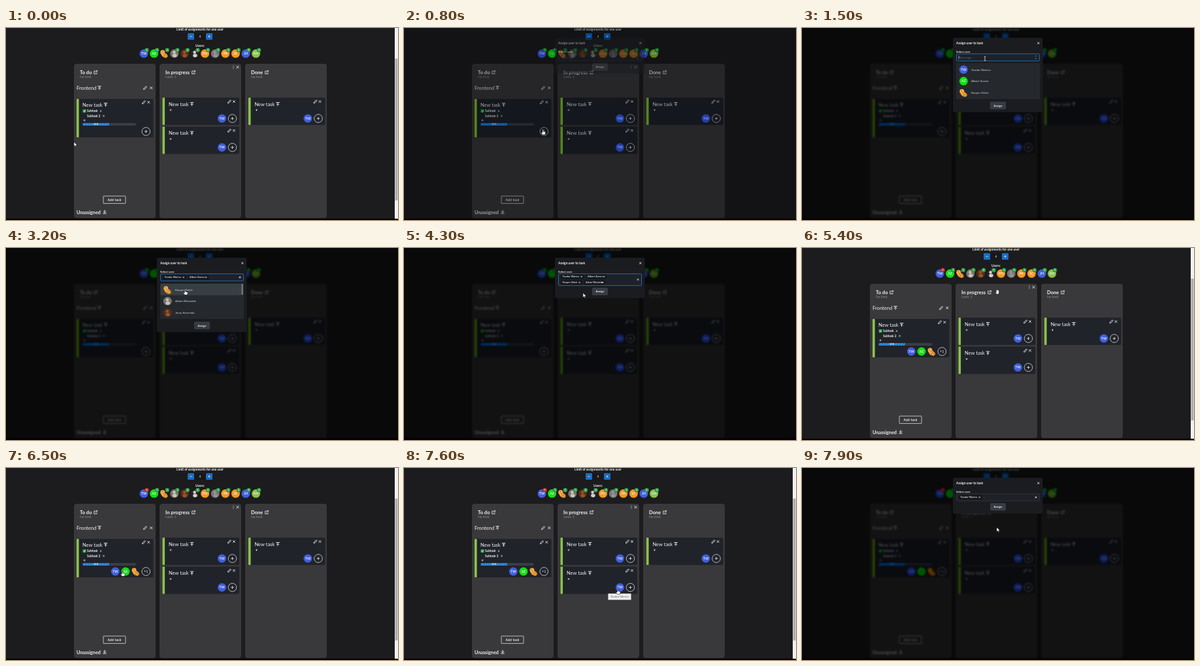
An HTML page that plays this animation: 600 by 295 pixels, repeating every 8000 ms.

```html
<!DOCTYPE html>
<html lang="en">
<head>
<meta charset="utf-8">
<title>Task board</title>
<style>
html, body { margin: 0; width: 100%; height: 100%; overflow: hidden; background: #000; }
svg { position: absolute; left: 0; top: 0; width: 600px; height: 295px; }
text { font-family: Lato, "Open Sans", sans-serif; white-space: pre; }
</style>
</head>
<body>
<svg id="board" viewBox="0 0 600 295"></svg>
<svg id="overlay" viewBox="0 0 600 295"></svg>
<script>
const LOOP = 8000, STEP = 100;
const board = document.getElementById('board');
const overlay = document.getElementById('overlay');

const GREEN = '#8bc34a', BLUE = '#3f5fdc', ORANGE = '#f9981d', CARD = '#20232a';
const users = [
  { name: 'Teodor Wanicz', tag: 'TW', fill: BLUE },
  { name: 'Albert Zumer', tag: 'AZ', fill: '#12e012' },
  { name: 'Kacper Zoleń', blob: true },
  { name: 'Adam Wostolak', fill: '#77756f', photo: '#c9c5bb' },
  { name: 'Jerzy Koremba', fill: '#5a2d16', photo: '#93562b' },
  { name: 'Natan Brozda', fill: '#252525', photo: '#d2d2cc' },
  { name: 'Pola Olmicka', tag: 'PO', fill: ORANGE },
  { fill: '#777', photo: '#949494' },
  { tag: 'PR', fill: ORANGE },
  { tag: 'SC', fill: ORANGE },
  { tag: 'JH', fill: BLUE },
  { tag: 'KH', fill: GREEN }
];

// Cursor keys: time, x, y, shape from that time on
const path = [
  [0, 104, 175, 'arrow'], [100, 104, 175, 'arrow'], [500, 211, 157, 'hand'],
  [900, 213, 157, 'arrow'], [1300, 280, 47, 'beam'], [1600, 280, 47, 'beam'],
  [1900, 272, 64, 'hand'], [2800, 272, 64, 'hand'], [3100, 274, 65, 'hand'],
  [4100, 274, 65, 'hand'], [4200, 274, 69, 'arrow'], [4400, 274, 69, 'arrow'],
  [4800, 299, 66, 'hand'], [5300, 299, 66, 'grab'], [5700, 299, 66, 'grab'],
  [6100, 290, 111, 'arrow'], [6400, 168, 159, 'hand'], [6700, 198, 160, 'hand'],
  [7000, 325, 178, 'hand'], [7200, 327, 187, 'hand'], [7600, 327, 187, 'hand'],
  [7700, 344, 182, 'hand'], [7800, 320, 134, 'arrow'], [7900, 298, 91, 'arrow']
];
const fade = [[0, 0], [700, 0], [900, 1], [5200, 1], [5400, 0], [7600, 0], [7800, 1], [8000, 1]];

// Linear value of column c in a table of keys
function at(keys, t, c) {
  const i = keys.findIndex(k => k[0] > t);
  if (i < 0) return keys[keys.length - 1][c];
  const a = keys[i - 1], b = keys[i];
  return a[c] + (b[c] - a[c]) * (t - a[0]) / (b[0] - a[0]);
}

const box = (x, y, w, h, fill, r = 0, more = '') =>
  `<rect x="${x}" y="${y}" width="${w}" height="${h}" fill="${fill}" rx="${r}" ${more}/>`;
const disc = (x, y, r, fill, more = '') => `<circle cx="${x}" cy="${y}" r="${r}" fill="${fill}" ${more}/>`;
const line = (d, w = 0.9, color = '#eee') =>
  `<path d="${d}" fill="none" stroke="${color}" stroke-width="${w}"/>`;
const place = (x, y, s, more = '') => `<g transform="translate(${x} ${y})" ${more}>${s}</g>`;
function text(x, y, s, size, { bold = false, fill = '#f2f2f2', mid = false, gap = 0 } = {}) {
  return `<text x="${x}" y="${y + size * 0.35}" font-size="${size}" fill="${fill}" font-weight="${bold ? 700 : 400}"` +
    `${mid ? ' text-anchor="middle"' : ''}${gap ? ` letter-spacing="${gap}"` : ''}>${s}</text>`;
}

const cross = (x, y, r = 1.8, w = 0.9) => place(x, y, line(`M${-r} ${-r}L${r} ${r}M${r} ${-r}L${-r} ${r}`, w));
const plus = (x, y, r = 1.8, w = 0.8) => place(x, y, line(`M${-r} 0H${r}M0 ${-r}V${r}`, w));
const pencil = (x, y) => place(x, y, line('M-2.5 2.5L-2 .8L1.3 -2.5L2.6 -1.2L-.8 2.1Z'));
const editIcon = (x, y) => place(x, y, line('M.5 -1.8H-2.3V2.5H2V.4M-.6 .8L2.5 -2.3M.8 -2.5H2.6V-.6', 0.8));
const raise = (x, y) => place(x, y, line('M-2.7 -2.5H2.7M0 2.8V-1M-2 .8L0 -1.2L2 .8', 1));
const lower = (x, y) => place(x, y, line('M-2.7 2.5H2.7M0 -2.8V1M-2 -.8L0 1.2L2 -.8', 1));
const ringAt = (x, y, label) =>
  disc(x, y, 6.3, 'none', 'stroke="#ddd" stroke-width=".8"') +
  (label ? text(x, y, label, 5.6, { mid: true }) : plus(x, y, 2.3));

function avatar(i, x, y) {
  const u = users[i];
  if (u.blob) {
    return place(x, y,
      '<ellipse cx="1.5" cy="2" rx="5.4" ry="3.4" transform="rotate(28)" fill="#f3a13a"/>' +
      disc(-2.5, -2, 3.5, '#f7ad49') +
      [[-3, -3], [-1, 0], [2, 2], [4, 4], [0, 4]].map(p => disc(p[0], p[1], 0.7, '#9c5419')).join(''));
  }
  const inside = u.tag ? text(0, 0, u.tag, 5, { mid: true, bold: true, fill: '#e9edff' })
    : disc(-0.4, -2, 2.2, u.photo) + `<ellipse cx=".4" cy="3" rx="3.2" ry="2.7" fill="${u.photo}"/>`;
  return place(x, y, disc(0, 0, 6.5, u.fill) + inside);
}

function column(x, title, limit, iconX) {
  return box(x, 55, 125, 237, '#39383a', 4) +
    text(x + 9, 68, title, 7.6, { bold: true }) + editIcon(iconX, 68) +
    text(x + 9, 75.3, limit, 5.1, { fill: '#8c8b8d' });
}

function card(x, y, h) {
  return box(x, y, 117.5, h, CARD, 2) + box(x, y, 3.6, h, GREEN, 1);
}

function smallCard(x, y) {
  return card(x, y, 42) + text(x + 9.5, y + 10, 'New task', 7.5) + raise(x + 45, y + 10) +
    pencil(x + 102.5, y + 6) + cross(x + 109.5, y + 6) + plus(x + 12.5, y + 19, 1.5, 0.7) +
    avatar(0, x + 91, y + 32) + ringAt(x + 107, y + 32);
}

function progress() {
  let s = box(117, 146, 82, 4, '#3a3d43', 2) + box(117, 146, 41, 4, '#1976d2', 2);
  for (let x = 119; x < 156; x += 4) s += line(`M${x} 149.6L${x + 2.5} 146.4`, 1.1, '#4b99e4');
  return s + text(137.8, 148, '50%', 3.6, { bold: true, mid: true });
}

function userRow(assigned) {
  return users.map((u, i) => {
    const x = 211 + i * 15.6;
    const left = i ? (assigned && i < 4 ? 3 : 4) : (assigned ? 0 : 1);
    return avatar(i, x, 39.3) + disc(x + 4.5, 34, 3.3, left ? '#2b9a43' : '#c62828') +
      text(x + 4.5, 34, left, 4, { mid: true, bold: true });
  }).join('');
}

function drawBoard(assigned, scrollbar) {
  let s = box(0, 0, 600, 293, '#1c1b1d');
  s += text(297, 2.6, 'Limit of assignments for one user', 4.9, { bold: true, mid: true });
  s += box(278, 8, 38, 10, '#18181b', 1);
  s += box(278, 8, 10, 10, '#1b6ec2', 1) + box(306, 8, 10, 10, '#1b6ec2', 1);
  s += line('M281.3 13H284.7', 0.8) + plus(311, 13, 1.7) + text(297, 13, '4', 4.8, { mid: true });
  s += text(297, 27, 'Users:', 5, { bold: true, mid: true }) + userRow(assigned);

  s += column(104, 'To do', 'No limit', 137) + column(235, 'In progress', 'Limit: 3', 287) +
    column(366, 'Done', 'No limit', 399);
  s += [58, 60, 62].map(y => disc(348, y, 0.6, '#eee')).join('') + cross(354.5, 60.2, 2);

  s += text(108, 92, 'Frontend', 7.6) + raise(143, 92) + pencil(213, 92) + cross(222.3, 92, 2);
  s += card(108, 109, 59) + text(117, 118, 'New task', 7.5) + raise(152.5, 118) +
    pencil(211, 114) + cross(218.3, 114);
  s += box(117.5, 125, 5, 5, '#2eb34a', 1) + line('M118.6 127.5L119.7 128.7L121.6 126.2', 0.8);
  s += text(124, 127.5, 'Subtask', 4.7, { bold: true }) + cross(145, 127.6, 1.3, 0.7);
  s += text(124, 135, 'Subtask 2', 4.7, { bold: true }) + cross(149.5, 135.1, 1.3, 0.7);
  s += plus(120, 141.8, 1.5, 0.7) + progress();
  if (assigned) s += [0, 1, 2].map(i => avatar(i, 167.3 + i * 15.6, 159)).join('');
  s += ringAt(214.3, 159, assigned ? '+1' : '');
  s += box(149, 258.2, 34, 11.4, 'none', 0.6, 'stroke="#ddd" stroke-width=".8"') +
    text(166, 264, 'Add task', 4.8, { bold: true, mid: true, gap: 0.3 });
  s += text(108, 283, 'Unassigned', 7.2, { bold: true }) + lower(151, 282.5);

  s += smallCard(239.5, 107) + smallCard(239.5, 151.5) + smallCard(371, 107);
  if (scrollbar) s += box(595, 0, 5, 293, '#f1f1f1') + box(595.5, 47, 4, 218, '#adadad');
  return s;
}

function chips(list) {
  const slots = [[240, 36], [278.5, 32], [240, 33], [275.5, 32]];
  return list.map((id, i) => {
    const [x, w] = slots[i], y = (list.length > 2 ? 44 : 45) + (i > 1 ? 9 : 0);
    return box(x, y - 3.6, w, 7.2, '#15171b', 1.5) +
      text(x + 2.6, y, users[id].name, 3.9, { bold: true, fill: '#d8d8d8' }) + cross(x + w - 4.3, y, 1.1, 0.7);
  }).join('');
}

function drawModal({ picked, open, focus, hover }) {
  const grow = picked.length > 2 ? 7 : 0;
  const top = 54 + grow, foot = (open ? 113.3 : 54) + grow;
  let s = box(231, 15, 137.5, foot + 16 - 15, '#1a1c20', 2);
  s += text(236, 23.5, 'Assign user to task', 4.95, { bold: true }) + cross(361.8, 23.3, 1.5);
  s += text(236, 36, 'Select user', 4.4, { bold: true });
  s += box(236.5, 39.7, 127, 11 + grow, '#1e2127', 1.5,
    `stroke="${focus ? '#2870b8' : '#30343a'}" stroke-width=".9"`);
  if (picked.length) {
    s += chips(picked) + cross(358, 45 + grow / 2, 1.4, 0.8);
  } else {
    s += text(240.5, 45, 'No assign', 4.5, { fill: '#62666d' });
    s += line('M356.7 44L358 42.5L359.3 44M356.7 46.3L358 47.8L359.3 46.3', 0.6, '#9a9da2');
    if (focus) s += line('M240 42.5V47.7', 0.6);
  }
  s += box(288, foot, 24, 11.5, '#383c42', 1.5) + text(300, foot + 5.8, 'Assign', 4.4, { bold: true, mid: true });
  if (!open) return s;

  s += box(236, top, 128, 55, '#25282d', 1.5);
  if (hover) s += box(236.5, top + 1, 124, 17.6, '#393e44');
  const rest = users.map((u, i) => i).filter(i => !picked.includes(i)).slice(0, 3);
  rest.forEach((id, i) => {
    const y = top + 10 + i * 17.6;
    s += avatar(id, 247.3, y) + text(259, y, users[id].name, 4.6, { fill: '#d5d5d5' });
  });
  if (hover) s += box(360.3, top + 1, 2.7, 17, '#6d7177', 1);
  return s;
}

const shapes = {
  arrow: 'M0 0V7L1.7 5.5L2.8 8L3.9 7.5L2.8 5.1H5Z',
  hand: 'M-.7 -1Q0 -1.8 .7 -1V2L3.6 2.7Q4.4 3 4.2 4L3.5 7H-.4L-2.8 4Q-2.6 2.9 -.7 4Z',
  grab: 'M-2.8 1L-1.7 2V-1.4H-.7V-2H.5V-1.5H1.6V-.8H2.6V3L1.6 5H-1L-3 2Z'
};
function cursor(t) {
  const shape = path.filter(k => k[0] <= t).pop()[3];
  const art = shape === 'beam'
    ? line('M-1.3 -3H1.3M0 -3V3M-1.3 3H1.3', 0.8, '#ddd')
    : `<path d="${shapes[shape]}" fill="#fff" stroke="#111" stroke-width=".6" stroke-linejoin="round"/>`;
  return place(at(path, t, 1), at(path, t, 2), art);
}

function modalState(t) {
  if (t > 7000) return { picked: [0], open: false, focus: false, hover: false };
  return {
    picked: [2200, 2900, 3600, 3900].flatMap((when, i) => t >= when ? [i] : []),
    open: t >= 1400 && t < 4200,
    focus: t >= 1400,
    hover: t >= 1900
  };
}

function draw(t) {
  const dim = at(fade, t, 1);
  board.innerHTML = drawBoard(t >= 5200, dim === 0);
  board.style.filter = dim
    ? `blur(${0.8 * dim}px) brightness(${1 - 0.68 * dim}) saturate(${1 + 0.7 * dim})` : 'none';
  let s = dim ? `<g opacity="${dim}">${drawModal(modalState(t))}</g>` : '';
  if (t >= 7400 && t < 7700) {
    s += box(312.5, 193, 35, 9.5, '#ececec', 0.5, 'stroke="#aaa" stroke-width=".5"') +
      text(330, 197.8, users[0].name, 4.3, { mid: true, fill: '#666' });
  }
  overlay.innerHTML = s + cursor(t) + box(0, 293, 600, 2, '#000');
}

const start = performance.now();
let last = -1;
function tick() {
  const t = Math.floor((performance.now() - start) % LOOP / STEP) * STEP;
  if (t !== last) draw(last = t);
  requestAnimationFrame(tick);
}
tick();
</script>
</body>
</html>
```
